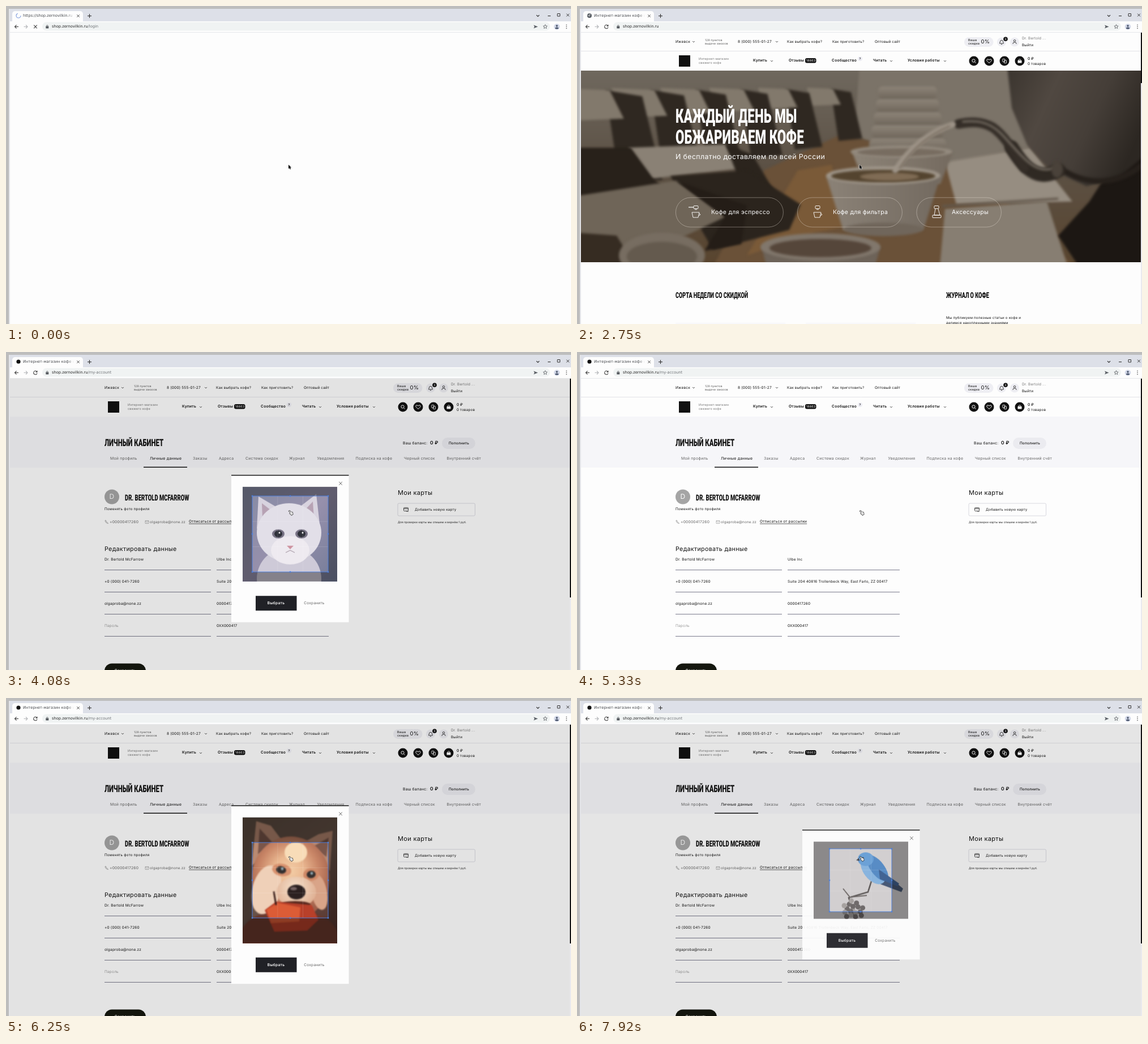
Write an HTML page with a canvas that moves like this. It is 998x561 px and loops after 8 s.

```html
<!DOCTYPE html>
<html lang="ru">
<head>
<meta charset="utf-8">
<title>Покупка кофе</title>
<style>
html, body { margin: 0; width: 100%; height: 100%; overflow: hidden; background: #fdfdfd; }
canvas { display: block; width: 100%; height: 100%; }
</style>
</head>
<body>
<canvas id="stage"></canvas>
<script>
const W = 998, H = 561, LOOP = 8000, DPR = window.devicePixelRatio || 1;
const stage = document.getElementById('stage');
stage.width = W * DPR;
stage.height = H * DPR;
let g = stage.getContext('2d');

const HOST = 'shop.zernovilkin.ru', PHONE = '8 (000) 555-01-27', MAIL = 'olgaproba@none.zz';
const USER = 'Dr. Bertold McFarrow';
const INK = '#111', GREY = '#777', PALE = '#f6f6f9', PAGE = '#fdfdfd', BLUE = '#4c7fdc';
const clamp = v => Math.max(0, Math.min(1, v));
const ramp = (t, from, to) => clamp((t - from) / (to - from));

// Drawing helpers
function rect(x, y, w, h, fill, r = 0) {
  g.beginPath();
  g.roundRect(x, y, w, h, r);
  g.fillStyle = fill;
  g.fill();
}
function frame(x, y, w, h, color, r = 0, lw = 1) {
  g.beginPath();
  g.roundRect(x, y, w, h, r);
  g.strokeStyle = color;
  g.lineWidth = lw;
  g.stroke();
}
function oval(x, y, rx, ry, fill, turn = 0) {
  g.beginPath();
  g.ellipse(x, y, rx, ry, turn, 0, Math.PI * 2);
  g.fillStyle = fill;
  g.fill();
}
const dot = (x, y, r, fill) => oval(x, y, r, r, fill);
function ring(x, y, r, color, lw = 1, from = 0, to = Math.PI * 2) {
  g.beginPath();
  g.arc(x, y, r, from, to);
  g.strokeStyle = color;
  g.lineWidth = lw;
  g.stroke();
}
function path(pts, closed) {
  g.beginPath();
  for (let i = 0; i < pts.length; i += 2) g.lineTo(pts[i], pts[i + 1]);
  if (closed) g.closePath();
}
function poly(fill, ...pts) { path(pts, true); g.fillStyle = fill; g.fill(); }
function line(color, lw, ...pts) { path(pts); g.strokeStyle = color; g.lineWidth = lw; g.stroke(); }
function curve(d, color, lw) { g.strokeStyle = color; g.lineWidth = lw; g.stroke(new Path2D(d)); }
function shades(s, colors) {
  colors.forEach((c, i) => s.addColorStop(i / (colors.length - 1), c));
  return s;
}
const grad = (x0, y0, x1, y1, ...colors) => shades(g.createLinearGradient(x0, y0, x1, y1), colors);
const glow = (x, y, r, ...colors) => shades(g.createRadialGradient(x, y, 0, x, y, r), colors);
function text(s, x, y, size, color = INK, weight = 400, align = 'left', family = 'Inter') {
  g.font = `${weight} ${size}px "${family}", sans-serif`;
  g.letterSpacing = family === 'Inter' ? size * .03 + 'px' : '0px';
  g.textAlign = align;
  g.textBaseline = 'middle';
  g.fillStyle = color;
  g.fillText(s, x, y);
  return g.measureText(s).width;
}
const ui = (s, x, y, color) => text(s, x, y, 6.7, color, 400, 'left', 'DejaVu Sans');
// Narrow display face
function title(s, x, y, size, color = INK, align = 'left') {
  g.save();
  g.translate(x, y);
  g.scale(.65, 1);
  text(s, 0, 0, size, color, 900, align, 'Roboto');
  g.restore();
}
function underlined(s, x, y, size, color, align) {
  const w = text(s, x, y, size, color, 400, align);
  const left = align === 'center' ? x - w / 2 : x;
  line(color, .7, left, y + size * .55, left + w, y + size * .55);
}
const chevron = (x, y) => line('#333', .8, x - 2, y - 1, x, y + 1, x + 2, y - 1);
function cross(x, y, r, color, lw = 1) {
  line(color, lw, x - r, y - r, x + r, y + r);
  line(color, lw, x - r, y + r, x + r, y - r);
}
function person(x, y, color) {
  ring(x, y - 1.6, 1.8, color, .9);
  ring(x, y + 4, 3.2, color, .9, Math.PI, 0);
}

// A picture is painted once into its own layer
function layer(x, y, w, h, blur, paint) {
  const c = document.createElement('canvas'), main = g;
  c.width = w * DPR;
  c.height = h * DPR;
  g = c.getContext('2d');
  g.scale(DPR, DPR);
  g.translate(-x, -y);
  g.filter = `blur(${blur * DPR}px)`;
  paint();
  g = main;
  return () => g.drawImage(c, x, y, w, h);
}

const hero = layer(7, 114, 989, 338, 2.2, () => {
  rect(-20, 90, W + 40, 390, grad(0, 114, 0, 452, '#6f685e', '#5c5145', '#59452f'));
  poly('#7b7368', 500, 90, 770, 90, 800, 250, 640, 280, 490, 230);
  poly('#6a5138', 235, 470, 330, 290, 470, 225, 700, 290, 890, 470);
  poly('#7a5a38', 300, 440, 390, 290, 450, 280, 470, 390, 420, 400);
  // Stacked cups in the distance
  for (let i = 0; i < 5; i++) {
    rect(532 - i * 4, 142 + i * 23, 104 + i * 8, 22, grad(0, 142 + i * 23, 0, 164 + i * 23, '#8d8478', '#6f665b'), 8);
  }
  // Receding row of bags: lit top, dark side
  for (let i = 0; i < 6; i++) {
    const x = 470 - i * 76, y = 168 + i * 4, s = 1 + i * .16;
    poly('#2f2821', x - 22 * s, y - 22 * s, x + 14 * s, y - 16 * s, x + 34 * s, y + 66 * s, x - 8 * s, y + 70 * s);
    poly('#82796c', x - 64 * s, y - 24 * s, x - 18 * s, y - 22 * s, x - 4 * s, y + 6 * s, x - 56 * s, y + 8 * s);
  }
  poly('#8a8175', 90, 250, 262, 244, 292, 286, 130, 305);
  poly('#2b241d', 262, 244, 310, 262, 350, 330, 290, 350, 280, 290);
  poly('#28211a', 0, 250, 95, 250, 135, 305, 165, 330, 0, 350);
  poly('#2b241d', 165, 300, 300, 290, 395, 350, 375, 395, 240, 430);
  poly('#6f6558', 0, 335, 175, 308, 262, 372, 150, 425, 0, 430);
  poly('#241d17', 175, 308, 300, 352, 290, 420, 225, 432, 262, 372);
  poly('#362c22', 0, 400, 70, 405, 110, 470, 0, 470);
  oval(150, 440, 76, 40, '#776d61');
  oval(150, 442, 62, 26, '#645a4e');
  poly('#968d81', 650, 275, 800, 250, 875, 345, 670, 350);
  poly('#877e72', 650, 358, 830, 345, 870, 470, 640, 470);
  line('#62574b', 4, 645, 353, 850, 340);
  // Cups
  poly(grad(484, 0, 664, 0, '#8d8478', '#746a5f'), 486, 258, 664, 258, 642, 314, 508, 314);
  oval(573, 257, 90, 11, '#948b7f');
  oval(573, 258, 78, 7, '#776c60');
  poly(grad(440, 0, 642, 0, '#8b8277', '#736a60'), 440, 300, 642, 300, 612, 395, 470, 395);
  oval(541, 394, 70, 12, '#70665b');
  oval(541, 299, 101, 16, '#a0978b');
  oval(541, 300, 92, 11, '#54442f');
  oval(552, 301, 52, 7, '#806c55');
  poly('#6d6359', 326, 425, 536, 425, 520, 480, 340, 480);
  oval(430, 425, 106, 24, '#81776c');
  oval(430, 427, 90, 16, '#55463a');
  // Kettle, hand and water
  poly('#1c1713', 850, 405, 905, 345, 940, 290, 1020, 240, 1020, 480, 900, 480);
  poly(grad(760, 114, 996, 220, '#3b352f', '#504841', '#453e38', '#2c2722'),
    758, 90, 768, 180, 795, 245, 835, 288, 900, 318, 960, 300, 1020, 250, 1020, 90);
  curve('M850 284 C900 320 960 318 1010 270', '#26201b', 10);
  g.lineCap = 'round';
  curve('M850 290 C812 312 788 282 768 250', '#2f2923', 25);
  curve('M790 285 C768 250 752 226 734 214 C714 203 694 204 674 208', '#352e28', 17);
  curve('M842 286 C806 300 780 256 748 224 C726 203 705 202 682 204', '#6d655b', 4);
  oval(848, 288, 10, 15, '#4a423a');
  curve('M664 209 C622 222 588 250 562 290', '#9d9387', 10);
  curve('M658 212 C622 227 592 252 570 286', '#7c7164', 3);
});

const cat = layer(418, 238, 167, 167, .7, () => {
  rect(410, 230, 190, 190, grad(418, 238, 585, 405, '#858ba4', '#9690ac', '#747c98'));
  oval(500, 400, 57, 55, '#cecad8');
  poly('#d8d3df', 443, 312, 446, 255, 492, 282);
  poly('#d8d3df', 555, 312, 548, 251, 510, 280);
  poly('#b7a2b4', 453, 295, 452, 267, 474, 284);
  poly('#b7a2b4', 544, 295, 542, 264, 525, 282);
  oval(500, 319, 57, 52, '#e2dfe8');
  oval(502, 350, 34, 25, '#eeeaf0');
  for (const x of [481, 522]) {
    oval(x, 321, 11, 8, '#777284');
    oval(x, 321, 7, 6, '#2e3039');
    dot(x + 2, 319, 1.5, '#fff');
  }
  poly('#cc8e9c', 496, 342, 508, 342, 502, 348);
  line('#9a8b98', 1, 494, 354, 502, 350, 510, 354);
});

const dog = layer(418, 211, 167, 222, 1.3, () => {
  rect(410, 200, 190, 250, grad(418, 211, 585, 432, '#5d4c40', '#69544a', '#55302a'));
  oval(500, 420, 86, 48, '#6b3a2e');
  poly('#b98a72', 434, 295, 442, 217, 468, 225, 496, 262);
  poly('#b98a72', 572, 305, 577, 234, 552, 240, 516, 260);
  poly('#7a564a', 445, 275, 448, 230, 474, 258);
  poly('#7a564a', 566, 280, 570, 246, 542, 262);
  oval(503, 318, 69, 74, glow(500, 305, 78, '#f4cfa8', '#eab891', '#c98667', '#a0604b'));
  oval(460, 338, 25, 44, '#efd0b8', .25);
  oval(553, 342, 14, 32, '#d9a488', -.2);
  oval(512, 272, 20, 18, '#f8dcb8');
  oval(487, 303, 17, 11, '#d8926f', .2);
  oval(539, 311, 14, 11, '#d08a68', -.1);
  oval(513, 342, 35, 27, glow(510, 335, 38, '#f6e2cc', '#e0b296'));
  oval(486, 303, 9, 6.5, '#35302f', .2);
  oval(539, 311, 8, 6.5, '#35302f', -.1);
  dot(488, 301, 2.4, '#93adb8');
  dot(540, 309, 2.4, '#93adb8');
  oval(513, 342, 16, 13, '#2b2020');
  oval(508, 336, 6, 3, '#746363');
  oval(511, 364, 27, 6, '#59291f');
  poly('#b8402a', 457, 374, 477, 359, 540, 365, 552, 391, 532, 410, 474, 412);
  poly('#dc5c36', 460, 373, 480, 361, 520, 369, 518, 394, 468, 397);
  line('#3d211c', 3, 473, 341, 477, 365);
});

const bird = layer(418, 254, 167, 136, .5, () => {
  rect(410, 245, 190, 160, '#cfcccd');
  line('#55504f', 2.5, 520, 323, 514, 342, 480, 352, 491, 389);
  line('#66605e', 2, 470, 336, 482, 351, 512, 348);
  for (let i = 0; i < 17; i++) {
    const a = i * 2.4, r = 5 * Math.sqrt(i);
    dot(487 + Math.cos(a) * r, 373 + Math.sin(a) * r * .8, 4.5, i % 3 ? '#666161' : '#a09b99');
  }
  poly('#3c4e6d', 540, 306, 576, 336, 573, 342, 533, 327);
  oval(523, 303, 17, 29, '#81afdc', -.65);
  oval(531, 300, 12, 27, '#4d85c2', -.65);
  poly('#365a8d', 533, 302, 569, 327, 566, 332, 535, 319);
  oval(510, 284, 14, 12, '#639bd4');
  poly('#3a3d46', 498, 282, 493, 286, 499, 287);
  dot(505, 282, 1.5, '#16202c');
});

// Each dialog: picture, its height, crop box, time on screen
const dialogs = [
  { pic: cat, h: 167, crop: [435, 254, 134, 134], from: 3530, to: 4900 },
  { pic: dog, h: 222, crop: [435, 255, 134, 133], from: 5590, to: 6950 },
  { pic: bird, h: 136, crop: [446, 266, 110, 111], from: 7640, to: 9000 }
];

function browser(t, page) {
  rect(0, 0, W, H, '#bdbdbd');
  rect(5, 5, W, H, '#e4e5e9');
  rect(7, 5, W, 24, '#dde0e8');
  rect(11, 9, 125, 24, '#fdfdfd', 5);
  rect(7, 27, W, 20, '#fdfdfd');
  rect(64, 28.5, 897, 15, '#f0f3f3', 7.5);
  rect(7, 46, W, .8, '#dfe0e5');

  if (page === 'blank') {
    const a = t / 160;
    ring(22, 17, 4, '#7e9bdd', 1.1, a, a + 4.4);
  } else if (page === 'home') {
    dot(22, 17, 4, '#5b6066');
    line('#fff', .8, 19, 16, 22, 18, 23, 14);
  } else dot(22, 17, 3.6, INK);
  const name = { blank: 'https://' + HOST, login: 'Авторизация' }[page] || 'Интернет-магазин кофе и чая';
  g.save();
  g.beginPath();
  g.rect(28, 9, 92, 17);
  g.clip();
  ui(name, 30, 17.5, '#45484c');
  g.restore();
  rect(108, 11, 12, 14, grad(108, 0, 120, 0, 'rgba(253,253,253,0)', '#fdfdfd'));
  cross(127.5, 17.5, 2.1, '#333');
  line('#333', 1.1, 144, 17.5, 151, 17.5);
  line('#333', 1.1, 147.5, 14, 147.5, 21);
  line('#333', 1.1, 937, 16, 939.5, 18.5, 942, 16);
  line('#333', 1.1, 957, 17.5, 962, 17.5);
  frame(974, 13.5, 4.5, 4.5, '#333');
  cross(992.5, 16, 2.4, '#333');

  line('#444', 1.1, 22, 36.5, 15.5, 36.5);
  line('#444', 1.1, 18.5, 33.5, 15.5, 36.5, 18.5, 39.5);
  line('#b5b7ba', 1.1, 31.5, 36.5, 38, 36.5);
  line('#b5b7ba', 1.1, 35, 33.5, 38, 36.5, 35, 39.5);
  if (page === 'blank') cross(52, 36.5, 2.8, '#444', 1.1);
  else {
    ring(52, 36.5, 3.2, '#444', 1.1, .3, 5.4);
    poly('#444', 55.5, 32.5, 55.5, 36, 52, 36);
  }
  rect(70.3, 35.5, 5, 4, '#55595e', .6);
  ring(72.8, 35.3, 1.5, '#55595e', .8, Math.PI, 0);
  const w = ui(HOST, 81, 36.5, '#222');
  ui({ blank: '/login', login: '/login', account: '/my-account' }[page] || '', 81 + w, 36.5, '#6c7074');
  poly('#5b6066', 932, 33.5, 939.5, 36.5, 932, 39.5, 933.5, 36.5);
  const star = [];
  for (let i = 0; i < 11; i++) {
    const a = i * Math.PI / 5 - Math.PI / 2, r = i % 2 ? 1.7 : 3.8;
    star.push(952.5 + Math.cos(a) * r, 36.5 + Math.sin(a) * r);
  }
  line('#55595e', .8, ...star);
  dot(973, 36.5, 5.3, '#d5daea');
  dot(973, 35, 1.7, '#49546a');
  oval(973, 39, 3, 1.6, '#49546a');
  for (const y of [33.5, 36.5, 39.5]) dot(990, y, .8, '#444');
}

function header(y, nav, inside) {
  const rule = inside ? 80 : 76;
  rect(7, 47, 989, rule - 47 + 34, PAGE);
  line('#dcdce3', .8, 7, rule - .4, 996, rule - .4);
  text('Ижевск', 174, y, 6.5);
  chevron(206, y);
  text('128 пунктов', 226, y - 3, 5, '#555');
  text('выдачи заказов', 226, y + 3.5, 5, '#555');
  text(PHONE, 284, y, 6.5);
  chevron(353, y);
  text('Как выбрать кофе?', 371, y, 6.3);
  text('Как приготовить?', 451, y, 6.2);
  text('Оптовый сайт', 526, y, 6.3);
  rect(180, nav - 9, 20, 20, INK);
  text('Интернет-магазин', 215, nav - 3, 5.6, GREY);
  text('свежего кофе', 215, nav + 4.5, 5.6, GREY);
  const items = [['Купить', 311, 344], ['Отзывы', 374], ['Сообщество', 450], ['Читать', 523, 555],
    ['Условия работы', 584, 650]];
  for (const [s, x, arrow] of items) {
    text(s, x, nav, 6.7, INK, 600);
    if (arrow) chevron(arrow, nav + 1);
  }
  rect(403, nav - 4, 19.5, 8.5, INK, 3);
  text('18863', 413, nav + .4, 5.4, '#fff', 400, 'center');
  dot(500, nav - 3, 4, '#ededf4');
  text('?', 500, nav - 3, 5.5, INK, 500, 'center');

  const cy = nav + 1;
  for (const x of [701, 728, 755, 782]) dot(x, cy, 8.5, INK);
  ring(700.5, cy - .5, 2.6, '#fff', 1);
  line('#fff', 1, 702.5, cy + 1.5, 704.5, cy + 3.5);
  curve(`M728 ${cy + 3.4} C720 ${cy - 2} 725.5 ${cy - 5} 728 ${cy - 1.7} C730.5 ${cy - 5} 736 ${cy - 2} 728 ${cy + 3.4}`, '#fff', 1);
  frame(751.8, cy - 3.5, 4, 5, '#fff', .5, .8);
  frame(754.5, cy - 1.3, 4, 5, '#fff', .5, .8);
  rect(778.5, cy - 1, 7, 4.6, '#fff', .7);
  ring(782, cy - 1, 2.1, '#fff', .9, Math.PI, 0);
  text('0 ₽', 796, nav - 3, 6.5, INK, 500);
  text('0 товаров', 796, nav + 6, 6.3);

  if (!inside) {
    dot(751.5, y, 8, '#ededf4');
    person(751.5, y, '#333');
    text('Вход', 765, y, 6.3);
    text('Регистрация', 787.5, y, 6.3);
    return;
  }
  rect(684, 55, 51.5, 17, '#eeeef3', 8.5);
  text('Ваша', 691, 60.5, 5.6);
  text('скидка', 691, 66.2, 5.6);
  text('0%', 713.5, 63, 9.4);
  dot(750, 63.5, 8, '#eeeef3');
  ring(750, 63, 2.6, '#333', .9, Math.PI, 0);
  line('#333', .9, 747.4, 63, 746.5, 66, 753.5, 66, 752.6, 63);
  line('#333', .9, 749, 67.6, 751, 67.6);
  dot(757, 58.3, 3.8, INK);
  text('0', 757, 58.5, 4.8, '#fff', 500, 'center');
  dot(773, 63.5, 8, '#eeeef3');
  person(773, 63, '#333');
  text('Dr. Bertold ...', 786, 57.5, 6.4, GREY);
  text('Выйти', 786, 69, 6.3);
}

function scrollbar(end) {
  rect(996, 47, 2, H, '#e9e9ee');
  rect(996, 47, 2, end - 47, INK);
}

function login(t) {
  header(62, 92, false);
  rect(7, 110, 989, 355, PALE);
  rect(7, 465, 989, 96, PAGE);
  title('АВТОРИЗАЦИЯ', 501.5, 157.5, 17.4, INK, 'center');
  text('E-mail', 405, 184.5, 9.4, '#666');
  text(MAIL.slice(0, Math.round(MAIL.length * ramp(t, 1150, 1400))), 405, 205, 6.4);
  line('#666', .8, 405, 222.6, 597.5, 222.6);
  text('Пароль', 405, 228.5, 9.5, '#666');
  const dots = Math.round(6 * ramp(t, 1420, 1580));
  for (let i = 0; i < dots; i++) dot(406.5 + i * 5.9, 249, .9, INK);
  line('#666', .8, 405, 266.6, 597.5, 266.6);
  frame(405.5, 280.5, 10, 9.5, '#777', 1, .8);
  text('Запомнить меня на этом компьютере', 422, 283, 6, '#999');
  rect(447, 301, 109, 26, '#000', 13);
  text('Войти', 501.5, 314, 7.3, '#fff', 600, 'center');
  underlined('Забыли пароль?', 501.5, 340, 8.3, INK, 'center');
  line('#d5d5dc', .8, 405, 354.6, 597.5, 354.6);
  ['#56606b', '#777', '#666', '#2daa3f', '#ee3f2c', '#a08a67'].forEach((c, i) => dot(431.5 + i * 28.1, 374.3, 4.5, c));
  line('#d5d5dc', .8, 405, 393.6, 597.5, 393.6);
  text('Регистрация', 501.5, 407, 8, INK, 600, 'center');

  const cols = [[174, 'ПОМОЩЬ', 'Сообщество', 'Правила сообщества'],
    [305, 'КОМПАНИЯ', 'О компании', 'Достижения'], [436, 'КАТАЛОГ', 'Кофе', 'Чай']];
  for (const [x, head, a, b] of cols) {
    text(head, x, 514, 6.8, INK, 700);
    text(a, x, 533.5, 6.9, GREY);
    text(b, x, 550.5, 6.9, GREY);
  }
  for (const [x, y] of [[354, 534], [355.5, 551]]) {
    frame(x, y - 2, 4, 4, '#aaa', .5, .7);
    line('#aaa', .8, x + 2, y, x + 5, y - 3);
  }
  text(PHONE, 829, 510, 13, INK, 600, 'right');
  text('Бесплатный звонок по России', 829, 525, 7.5, GREY, 400, 'right');
  frame(755.5, 545.5, 73, 30, '#eed15a', 1, 1.5);
  text('Рейтинг магазина', 790, 556.5, 6, INK, 700, 'center', 'Open Sans');
  scrollbar(521);

  const shown = ramp(t, 1000, 1180);
  if (!shown) return;
  g.save();
  g.globalAlpha = shown;
  g.shadowColor = 'rgba(70,70,110,.25)';
  g.shadowBlur = 10 * DPR;
  rect(812, 60, 170, 165, '#fff', 11);
  g.shadowColor = 'transparent';
  dot(897, 92, 22, '#f8553f');
  cross(965.5, 76, 3.7, '#aaa', 1);
  text('Используйте аккаунт Юнторка', 897, 133.5, 8.4, INK, 600, 'center');
  text('для входа на сервис', 897, 145, 8.4, INK, 600, 'center');
  text('Безопасный вход без дополнительной', 897, 159.5, 7.2, '#909096', 400, 'center');
  text('регистрации на сайте', 897, 170, 7.2, '#909096', 400, 'center');
  rect(820, 188, 154, 28.5, '#24252b', 8);
  dot(858.5, 202.3, 6.3, '#f4442f');
  text('Войти с Юнторк ID', 871, 202.5, 7.3, '#fff');
  g.restore();
}

function home() {
  rect(7, 47, 991, 514, PAGE);
  header(63, 96, true);
  hero();
  title('КАЖДЫЙ ДЕНЬ МЫ', 174, 195.5, 34.5, '#fff');
  title('ОБЖАРИВАЕМ КОФЕ', 174, 232.5, 34.5, '#fff');
  text('И бесплатно доставляем по всей России', 174, 266.5, 12.4, '#fff');
  const pills = [[174, 190, 'Кофе для эспрессо', 237], [389, 185, 'Кофе для фильтра', 452], [599.5, 149.5, 'Аксессуары', 662]];
  pills.forEach(([x, w, s, tx], i) => {
    frame(x + .4, 338, w, 52, 'rgba(235,228,218,.5)', 26, .8);
    text(s, tx, 363.5, 10.4, '#fff');
    const c = tx - 27;
    frame(c - 4, 352.5, 8, 5, '#fff', 1, .9);
    if (i === 0) line('#fff', 1.2, c - 4, 355, c - 13, 355);
    if (i < 2) {
      line('#fff', .9, c - 2, 359, c + 2, 359);
      line('#fff', .9, c - 7, 364, c + 6, 364, c + 4, 373, c - 5, 373, c - 7, 364);
      line('#fff', .9, c + 6, 366, c + 8, 368, c + 5, 370);
    } else {
      line('#fff', .9, c - 2, 358, c - 4, 369, c + 6, 369, c + 3, 358);
      frame(c - 7, 369, 15, 4.5, '#fff', .5, .9);
    }
  });
  title('СОРТА НЕДЕЛИ СО СКИДКОЙ', 174, 510.5, 14);
  title('ЖУРНАЛ О КОФЕ', 652, 510.5, 14);
  text('Мы публикуем полезные статьи о кофе и', 652, 550.5, 6.2);
  text('делимся накопленными знаниями', 652, 559, 6.2);
  rect(174, 558.5, 194, 3, '#f8f8fb');
  rect(404, 558.5, 194, 3, '#f8f8fb');
  scrollbar(136);
}

function account() {
  rect(7, 47, 991, 514, PAGE);
  header(63, 96, true);
  rect(7, 114, 989, 90, PALE);
  title('ЛИЧНЫЙ КАБИНЕТ', 174, 161, 17.5);
  text('Ваш баланс:', 701, 161, 6.8);
  text('0 ₽', 749, 160.5, 8.5, INK, 600);
  rect(770, 151, 59, 20, '#ebebf0', 10);
  text('Пополнить', 800, 161, 6.4, INK, 500, 'center');
  const tabs = [['Мой профиль', 184], ['Личные данные', 254], ['Заказы', 330], ['Адреса', 376],
    ['Система скидок', 423], ['Журнал', 500], ['Уведомления', 549.5], ['Подписка на кофе', 617.5],
    ['Черный список', 703], ['Внутренний счёт', 778.5]];
  tabs.forEach(([s, x], i) => text(s, x, 187.5, 6.9, i === 1 ? INK : '#666'));
  rect(243, 202.5, 77, 1.5, INK);

  dot(187, 255.5, 13, '#a5a5a5');
  text('D', 187, 255.5, 12, '#fff', 400, 'center');
  title(USER.toUpperCase(), 210, 257.5, 14.6);
  text('Поменять фото профиля', 174, 277.5, 6.3);
  curve('M175 297 C175 300 177.5 302.5 180.5 302.5 L179 300.5 L177.5 300 L176.5 297 Z', '#999', .8);
  text('+00000417260', 183, 300, 6.7, '#666');
  frame(246, 297.5, 6, 5, '#999', .3, .7);
  line('#999', .7, 246, 298, 249, 300.5, 252, 298);
  text(MAIL, 254, 300, 6.3, '#666');
  underlined('Отписаться от рассылки', 323, 299.5, 6.5, INK);

  text('Редактировать данные', 174, 347.5, 10.7);
  const rows = [[USER, 'Ulbe Inc'], ['+0 (000) 041-7260', 'Suite 204 40816 Trollenbeck Way, East Farlo, ZZ 00417'],
    [MAIL, '0000417260'], ['Пароль', '0XX000417']];
  rows.forEach(([a, b], i) => {
    const y = 366.5 + i * 39;
    text(a, 174, y, 6.5, i === 3 ? '#999' : INK);
    text(b, 372, y, 6.4);
    line('#6c6c80', .9, 174, y + 18, 362, y + 18);
    line('#6c6c80', .9, 372, y + 18, 570, y + 18);
  });
  rect(174, 549.5, 73, 26, '#15170f', 13);
  text('Сохранить', 210.5, 562.5, 6.6, '#fff', 600, 'center');

  text('Мои карты', 692, 248.5, 11);
  frame(692, 267, 136.5, 22, '#d0d0d8', 2, .8);
  frame(702.5, 274.5, 8, 6, '#333', 1, .9);
  line('#333', 1, 702.5, 276.5, 710.5, 276.5);
  line('#333', .9, 707, 281, 711, 281);
  text('Добавить новую карту', 722, 278, 6.2);
  text('Для проверки карты мы спишем и вернём 1 руб.', 692, 300.5, 4.8);
  scrollbar(433);
}

function dialog({ pic, h, crop, from, to }, t) {
  const alpha = Math.min(ramp(t, from, from + 300), 1 - ramp(t, to, to + 300));
  if (alpha <= 0) return;
  const full = h + 93, top = 346.8 - full / 2, low = top + full, y = top + 21;
  const [cx, cy, cw, ch] = crop;
  g.save();
  g.globalAlpha = alpha;
  rect(7, 47, 989, 514, 'rgba(0,0,0,.1)');
  rect(398, top, 207.5, full, '#fdfdfd');
  rect(398, top, 207.5, 1.5, INK);
  cross(591, top + 15, 2.8, '#555', .9);
  g.translate(0, y - Math.round(y));
  pic();
  g.translate(0, Math.round(y) - y);
  // Shade everything outside the crop box
  g.beginPath();
  g.rect(418, y, 167, h);
  g.rect(cx, cy, cw, ch);
  g.fillStyle = 'rgba(0,0,0,.36)';
  g.fill('evenodd');
  for (let i = 1; i < 3; i++) {
    rect(cx + cw * i / 3, cy, .5, ch, 'rgba(255,255,255,.25)');
    rect(cx, cy + ch * i / 3, cw, .5, 'rgba(255,255,255,.25)');
  }
  frame(cx, cy, cw, ch, BLUE, 0, 1);
  for (let i = 0; i < 9; i++) {
    if (i !== 4) rect(cx + cw * (i % 3) / 2 - 1.2, cy + ch * Math.floor(i / 3) / 2 - 1.2, 2.4, 2.4, BLUE);
  }
  rect(441, low - 46.5, 72.5, 26, '#202126');
  text('Выбрать', 477, low - 33.5, 6.7, '#fff', 600, 'center');
  text('Сохранить', 544.5, low - 33.5, 6.6, '#666', 400, 'center');
  g.restore();
}

function pointer(hand) {
  const shape = hand
    ? [499.5, 280.5, 501, 280, 503, 282, 506, 282.5, 507, 286, 504.5, 288, 501, 285, 502, 283.5]
    : [499, 280, 499, 287.2, 500.6, 285.8, 501.8, 288.2, 503, 287.6, 502, 285.3, 504, 285];
  path(shape, true);
  g.lineWidth = hand ? 1.1 : 1;
  g.strokeStyle = hand ? '#111' : '#fff';
  g.stroke();
  g.fillStyle = hand ? '#ddd' : '#000';
  g.fill();
}

function draw(t) {
  const page = t < 600 ? 'blank' : t < 2400 ? 'login' : t < 3100 ? 'home' : 'account';
  g.setTransform(DPR, 0, 0, DPR, 0, 0);
  g.textRendering = 'geometricPrecision';
  browser(t, page);
  if (page === 'blank') rect(7, 47, 991, 514, PAGE);
  else if (page === 'login') login(t);
  else if (page === 'home') home();
  else {
    account();
    dialogs.forEach(d => dialog(d, t));
  }
  pointer(page === 'account');
}

const start = performance.now();
function tick() {
  draw((performance.now() - start) % LOOP);
  requestAnimationFrame(tick);
}
tick();
</script>
</body>
</html>
```
